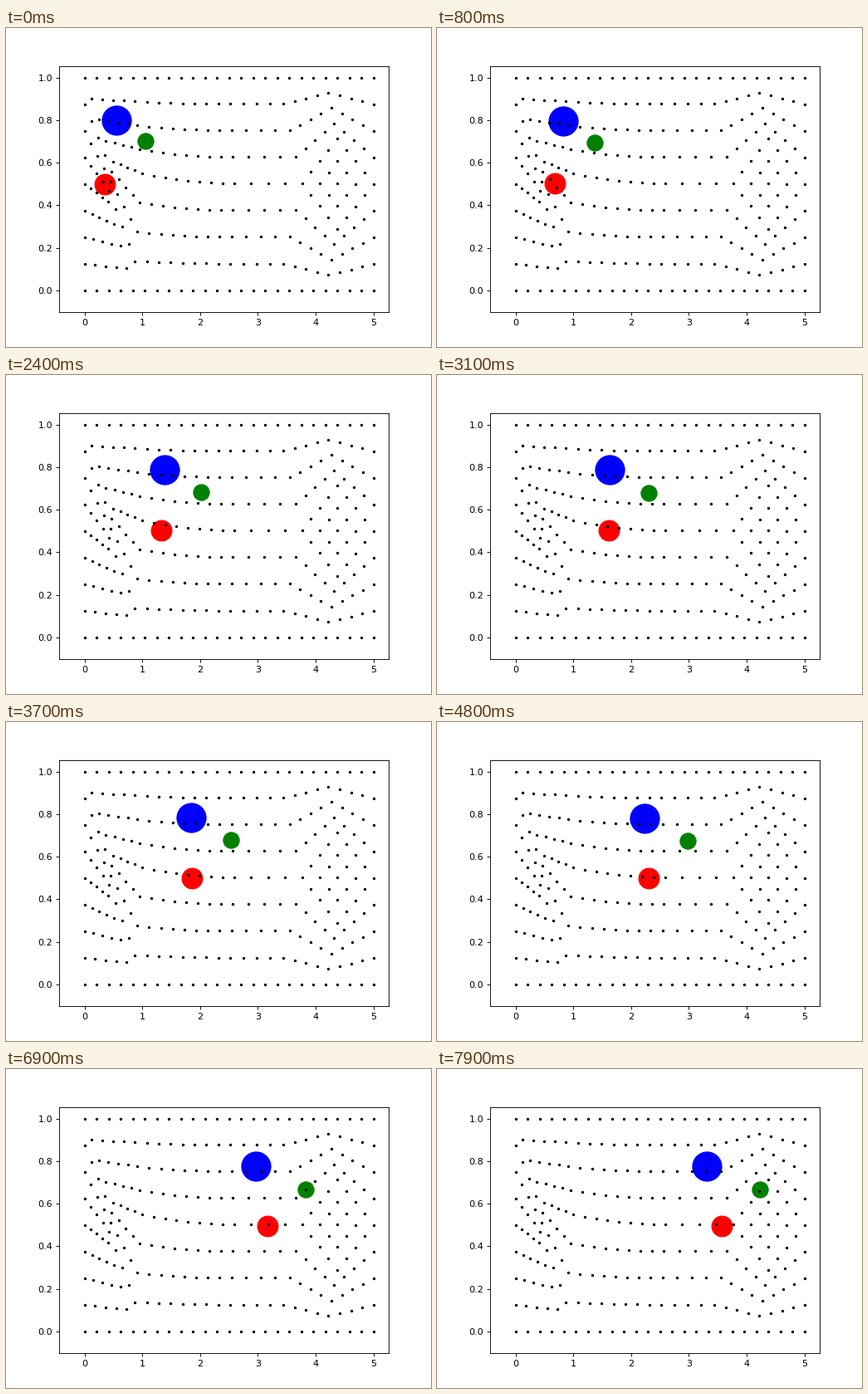
A matplotlib script that plays this animation: 512 by 384 pixels, repeating every 8 s.

```python
import numpy as np
import matplotlib.pyplot as plt
from matplotlib.animation import FuncAnimation

FRAMES, INTERVAL = 80, 100

# corners of the mesh blocks
TOP, BOTTOM = (5 / 6, 1), (5 / 6, 0)
WEST, NORTH, SOUTH, EAST = (0, 0.5), (0.494, 0.6045), (0.408, 0.417), (0.996, 0.55)
TIP, FAR = (3.766, 0.503), (5, 0.5)
HIGH, LOW = (4.37, 0.713), (4.37, 0.29)
UP, DOWN = 0.078, -0.09


def lerp(a, b, t):
    return np.asarray(a, float) * (1 - t) + np.asarray(b, float) * t


def patch(a, b, c, d, n=4):
    """Bilinear grid between the edges a-b and c-d."""
    steps = np.linspace(0, 1, n + 1)
    return [lerp(lerp(a, b, v), lerp(c, d, v), u) for v in steps for u in steps]


def fan(apex, left, right, bulge):
    """Triangular block whose rows bow outwards away from the apex."""
    pts = []
    for k in range(1, 5):
        p, q = lerp(apex, left, k / 4), lerp(apex, right, k / 4)
        for f in np.linspace(0, 1, k + 1):
            bow = 4 * f * (1 - f) * (k / 4) ** 2
            pts.append(lerp(p, q, f) + bow * np.array([-0.02, bulge]))
    return pts


def core():
    """Interior of the twisted block between the two fans."""
    pts = []
    inner = (0.25, 0.5, 0.75)
    for v in inner:
        for u in inner:
            s = np.sin(np.pi * u)
            dy = lerp(UP, DOWN, v) * s ** 2 + 0.0235 * np.sin(2 * np.pi * u)
            pts.append(lerp(lerp(WEST, NORTH, u), lerp(SOUTH, EAST, u), v)
                       + [-0.025 * s, dy])
    return pts


def channel():
    """Rows through the middle, settling onto even heights."""
    pts = []
    for j in range(9):
        k = min(j, 8 - j) / 4
        x, y = lerp(TOP if j <= 4 else BOTTOM, EAST, k)
        x1, x2 = 2.5 + 0.086 * k, lerp(10 / 3, TIP[0], k)
        y1 = 1 - j / 8 + 0.003 * k
        for f in np.linspace(0, 1, 9):
            pts.append((lerp(x, x1, f), y1 + (y - y1) * (1 - f) ** 2))
        pts += [(lerp(x1, x2, f), y1) for f in np.linspace(0, 1, 5)]
    return pts


def lens(wall, peak):
    """Blocks between one wall and the diamond at the right."""
    inlet, crest, outlet = (10 / 3, wall), (25 / 6, wall), (5, wall)
    return patch(inlet, TIP, crest, peak) + patch(crest, peak, outlet, FAR)


def build_mesh():
    pts = patch((0, 1), NORTH, TOP, EAST)
    pts += patch(WEST, (0, 0), SOUTH, BOTTOM)
    pts += fan((0, 1), WEST, NORTH, UP)
    pts += fan(BOTTOM, SOUTH, EAST, DOWN)
    pts += core() + channel()
    pts += lens(1, HIGH) + lens(0, LOW) + patch(TIP, LOW, HIGH, FAR)

    # drop nodes shared by neighbouring blocks
    kept = []
    for p in pts:
        if all(abs(p[0] - q[0]) + abs(p[1] - q[1]) > 0.015 for q in kept):
            kept.append(p)
    return np.array(kept)


class Particle:
    """Drifts along at constant speed while its height relaxes."""

    def __init__(self, ax, color, size, start, speed, sink, tau, slope=0):
        self.start, self.speed = start, speed
        self.sink, self.tau, self.slope = sink, tau, slope
        self.dot = ax.scatter(*start, s=size, c=color)

    def move(self, t):
        x, y = self.start
        fall = self.sink * (1 - np.exp(-t / self.tau))
        self.dot.set_offsets([[x + self.speed * t, y + self.slope * t - fall]])
        return self.dot


fig, ax = plt.subplots(figsize=(6.4, 4.8), dpi=80)
ax.set_xlim(-0.4389, 5.259)
ax.set_ylim(-0.1008, 1.0524)
ax.plot(*build_mesh().T, "k.", markersize=4, zorder=3)

particles = [
    Particle(ax, "red", 500, (0.35, 0.5), 0.407, -0.006, 0.5, slope=-0.0016),
    Particle(ax, "blue", 1000, (0.55, 0.8), 0.349, 0.035, 6),
    Particle(ax, "green", 300, (1.05, 0.7), 0.4025, 0.041, 4.6),
]


def update(frame):
    return [p.move(frame * INTERVAL / 1000) for p in particles]


anim = FuncAnimation(fig, update, frames=FRAMES, interval=INTERVAL,
                     repeat=True, repeat_delay=0)
plt.show()
```
